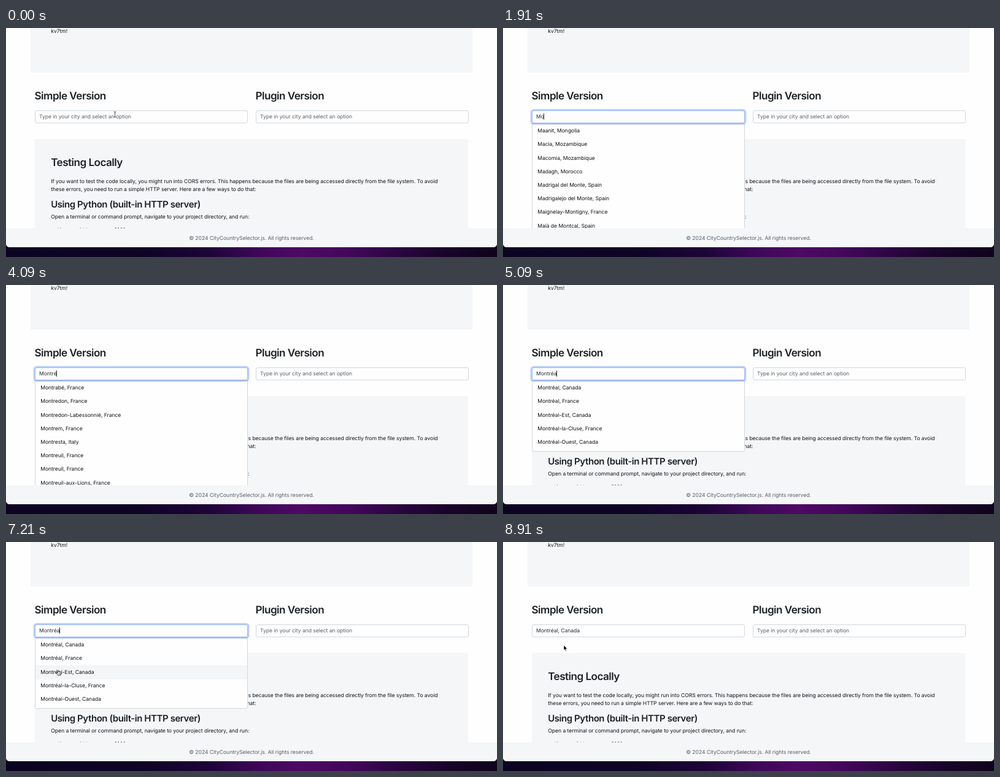
An HTML page for the animation above (8.94 s loop, 800 px wide and 375 px high).

```html
<!DOCTYPE html>
<html lang="en">
<head>
<meta charset="utf-8">
<title>City selector demo</title>
<style>
  html, body { margin: 0; width: 100%; height: 100%; overflow: hidden; }
  body {
    position: relative;
    font: 400 8.6px/20px Inter, "Open Sans", sans-serif;
    font-optical-sizing: none;
    text-rendering: geometricPrecision;
    letter-spacing: -0.006em;
    color: #101215;
    background: #10031c;
  }
  div, i, svg { position: absolute; box-sizing: border-box; }
  #wall {
    left: 0; top: 350px; width: 800px; height: 25px;
    background: linear-gradient(90deg, #0c0322 0, #0f0326 220px, #1d0438 330px,
      #3d0758 410px, #4e0965 480px, #42075a 560px, #2a0540 640px, #180429 720px, #10031c 800px);
  }
  #page {
    left: 0; top: 0; width: 800px; height: 359px;
    overflow: hidden; background: #fefefe; border-radius: 0 0 6px 6px;
  }
  .text { white-space: pre; height: 20px; }
  .h2, .h3 { font-weight: 600; color: #1d2125; }
  .h2 { font-size: 17.15px; letter-spacing: -0.032em; }
  .h3 { font-size: 15px; letter-spacing: -0.029em; }
  .code { font: 7.78px/20px "DejaVu Sans Mono", monospace; letter-spacing: 0; }
  .hint { color: #5a6067; }
  .value { color: #2a2e33; }
  .panel { background: #f5f6f8; }
  .field { border: 1px solid #d3d7dc; border-radius: 3px; background: #fefefe; }
  #ring { border: 1px solid #9dbdf9; border-radius: 3px; box-shadow: 0 0 0 2.3px rgba(60, 120, 245, .36); }
  #caret { width: 1px; height: 10px; top: 4.5px; margin-left: -.7px; background: #222; }
  #menu {
    left: 47px; top: 156px; width: 347px; overflow: hidden;
    background: #fefefe; border: 1px solid #d3d5d8; border-radius: 0 0 3px 3px;
  }
  .row { left: 0; width: 345px; height: 22.2px; }
  .row.hover { background: #f4f5f6; }
  #foot {
    left: 0; top: 328px; width: 800px; height: 32px;
    background: #f5f6f8; color: #585e64; text-align: center; line-height: 34px;
  }
  #mouse { left: 0; top: 0; width: 16px; height: 16px; overflow: visible; }
</style>
</head>
<body>
<div id="wall"></div>
<div id="page"></div>
<svg id="mouse">
  <path data-kind="arrow" d="M0 0V8.2L1.9 6.5L3.2 9.3L4.5 8.7L3.2 6H5.8Z"
    fill="#000" stroke="#fff" stroke-width=".6"/>
  <path data-kind="beam" d="M-1.7 -4.4Q0 -4.4 0 -3.4Q0 -4.4 1.7 -4.4M0 -3.4V3.6M-1.7 4.6Q0 4.6 0 3.6Q0 4.6 1.7 4.6"
    fill="none" stroke="#222" stroke-width=".8"/>
  <path data-kind="hand" d="M-.8 .6Q0 -.5 .8 .6V3.2Q1.7 2.6 2.3 3.4Q3.2 2.9 3.7 3.8Q5 3.5 5 4.9Q5 7 4 8.6H-.3
    Q-1.4 7 -3 5.2Q-2.9 4 -1.8 4.5L-.8 5.4ZM1 5.6V7.4M2.3 5.6V7.4M3.5 5.6V7.4"
    fill="#fff" stroke="#111" stroke-width=".7" stroke-linejoin="round"/>
</svg>
<script>
const LOOP = 8940, FOCUS = 400, PICK = 7900, LIST_LAG = 70;
const ROW = 22.2, ROW_TOP = 158, MAX_ROWS = 8;
const HINT = 'Type in your city and select an option';
const CHOICE = 'Montréal, Canada';
const KEYS = [[1150, 'M'], [1550, 'Mo'], [2250, 'Mon'], [2650, 'Mont'],
  [3450, 'Montr'], [4075, 'Montré'], [4800, 'Montréa']];
const CITIES = [
  'Maanit, Mongolia', 'Macia, Mozambique', 'Macomia, Mozambique', 'Madagh, Morocco',
  'Madrigal del Monte, Spain', 'Madrigalejo del Monte, Spain', 'Maignelay-Montigny, France',
  'Maià de Montcal, Spain', 'Malagana (San Antonio del Monte), Mexico',
  'Mamontovka, Russia', 'Mamontovo, Russia', 'Mamontovskiy Rayon, Russia',
  'Montrabé, France', 'Montredon, France', 'Montredon-Labessonnié, France', 'Montrem, France',
  'Montresta, Italy', 'Montreuil, France', 'Montreuil, France', 'Montreuil-aux-Lions, France',
  'Montréal, Canada', 'Montréal, France', 'Montréal-Est, Canada', 'Montréal-la-Cluse, France',
  'Montréal-Ouest, Canada', 'Montréjeau, France', 'Montrésor, France', 'Montréverd, France'
];
// Pointer path: time, x, y
const PATH = [[6030, 177.5, 141.5], [6320, 14, 130], [6390, 19, 130.5], [6480, 24, 136],
  [6930, 74, 204], [7210, 85, 209.8], [7380, 87, 209], [7750, 99, 169]];

const page = document.getElementById('page');
const mouse = document.getElementById('mouse');

function add(parent, cls, x, y, w, h) {
  const el = document.createElement('div');
  el.className = cls;
  Object.assign(el.style, { left: x + 'px', top: y + 'px' });
  if (w) Object.assign(el.style, { width: w + 'px', height: h + 'px' });
  parent.appendChild(el);
  return el;
}

function write(parent, cls, x, y, str) {
  const el = add(parent, 'text ' + cls, x, y - 10);
  el.textContent = str;
  return el;
}

add(page, 'panel', 40, 0, 720, 73);
write(page, '', 73.3, 6, 'kv7tm!');
write(page, 'h2', 46.5, 111.5, 'Simple Version');
write(page, 'h2', 406.5, 111.5, 'Plugin Version');
add(page, 'field', 47, 135, 347, 21);
add(page, 'field', 407, 135, 347, 21);
write(page, 'hint', 414, 145.7, HINT);
const hint = write(page, 'hint', 54, 145.7, HINT);
const panel = add(page, 'panel', 47, 182, 706, 160);
panel.style.borderRadius = '3px';
write(page, 'h2', 73.2, 220.7, 'Testing Locally');
write(page, '', 73.3, 252, 'If you want to test the code locally, you might run into CORS errors. This happens because the files are being accessed directly from the file system. To avoid');
write(page, '', 73.3, 264.6, 'these errors, you need to run a simple HTTP server. Here are a few ways to do that:');
write(page, 'h3', 73.2, 289.3, 'Using Python (built-in HTTP server)');
write(page, '', 73.3, 309.7, 'Open a terminal or command prompt, navigate to your project directory, and run:');
write(page, 'code', 73.3, 330.5, 'python -m http.server 8000');

const menu = add(page, '', 47, 156);
menu.id = 'menu';
const rows = Array.from({ length: MAX_ROWS }, (_, i) => {
  const box = add(menu, 'row', 0, ROW_TOP - 157 + i * ROW);
  return { box, label: write(box, '', 8.2, 11.2, '') };
});

const ring = add(page, '', 47, 135, 347, 21);
ring.id = 'ring';
const value = write(page, 'value', 54, 145.7, '');
const typed = document.createTextNode('');
const caret = document.createElement('i');
caret.id = 'caret';
value.append(typed, caret);

const foot = add(page, '', 0, 328);
foot.id = 'foot';
foot.textContent = '© 2024 CityCountrySelector.js. All rights reserved.';

const clamp = v => Math.max(0, Math.min(1, v));
const ease = v => v * v * (3 - 2 * v);
const lastKey = t => KEYS.filter(k => k[0] <= t).pop() || [FOCUS, ''];

function matches(t) {
  const query = lastKey(t - LIST_LAG)[1].toLowerCase();
  if (query.length < 2 || t >= PICK) return [];
  return CITIES.filter(c => c.toLowerCase().includes(query)).slice(0, MAX_ROWS);
}

function pointer(t) {
  if (t <= PATH[0][0]) return PATH[0].slice(1);
  const n = PATH.findIndex(p => p[0] > t);
  if (n < 0) return PATH[PATH.length - 1].slice(1);
  const [t0, x0, y0] = PATH[n - 1], [t1, x1, y1] = PATH[n];
  const k = ease((t - t0) / (t1 - t0));
  return [x0 + (x1 - x0) * k, y0 + (y1 - y0) * k];
}

function render(t) {
  const [keyTime, query] = lastKey(t);
  const picked = t >= PICK;
  const focused = t >= FOCUS && !picked;
  const text = picked ? CHOICE : query;
  if (typed.data !== text) typed.data = text;
  hint.style.visibility = text ? 'hidden' : 'visible';
  caret.style.visibility = focused && (t - keyTime) % 1000 < 500 ? 'visible' : 'hidden';
  ring.style.opacity = ease(clamp((t - FOCUS) / 150)) - ease(clamp((t - PICK) / 150));

  const list = matches(t);
  const [x, y] = pointer(t);
  const inBox = x > 47 && x < 394;
  const over = inBox && y >= ROW_TOP ? Math.floor((y - ROW_TOP) / ROW) : -1;
  const shown = t < KEYS[0][0] || t >= PATH[0][0];
  menu.style.display = list.length ? 'block' : 'none';
  menu.style.height = 6 + list.length * ROW + 'px';
  rows.forEach(({ box, label }, i) => {
    const name = list[i] || '';
    if (label.textContent !== name) label.textContent = name;
    box.classList.toggle('hover', shown && !!name && i === over);
  });

  const kind = inBox && y > 135 && y < 156 ? 'beam' : list[over] ? 'hand' : 'arrow';
  mouse.style.visibility = shown ? 'visible' : 'hidden';
  mouse.style.transform = `translate(${x}px, ${y}px)`;
  for (const shape of mouse.children) {
    shape.style.display = shape.dataset.kind === kind ? 'inline' : 'none';
  }
}

const start = performance.now();
function tick() {
  render((performance.now() - start) % LOOP);
  requestAnimationFrame(tick);
}
tick();
</script>
</body>
</html>
```
